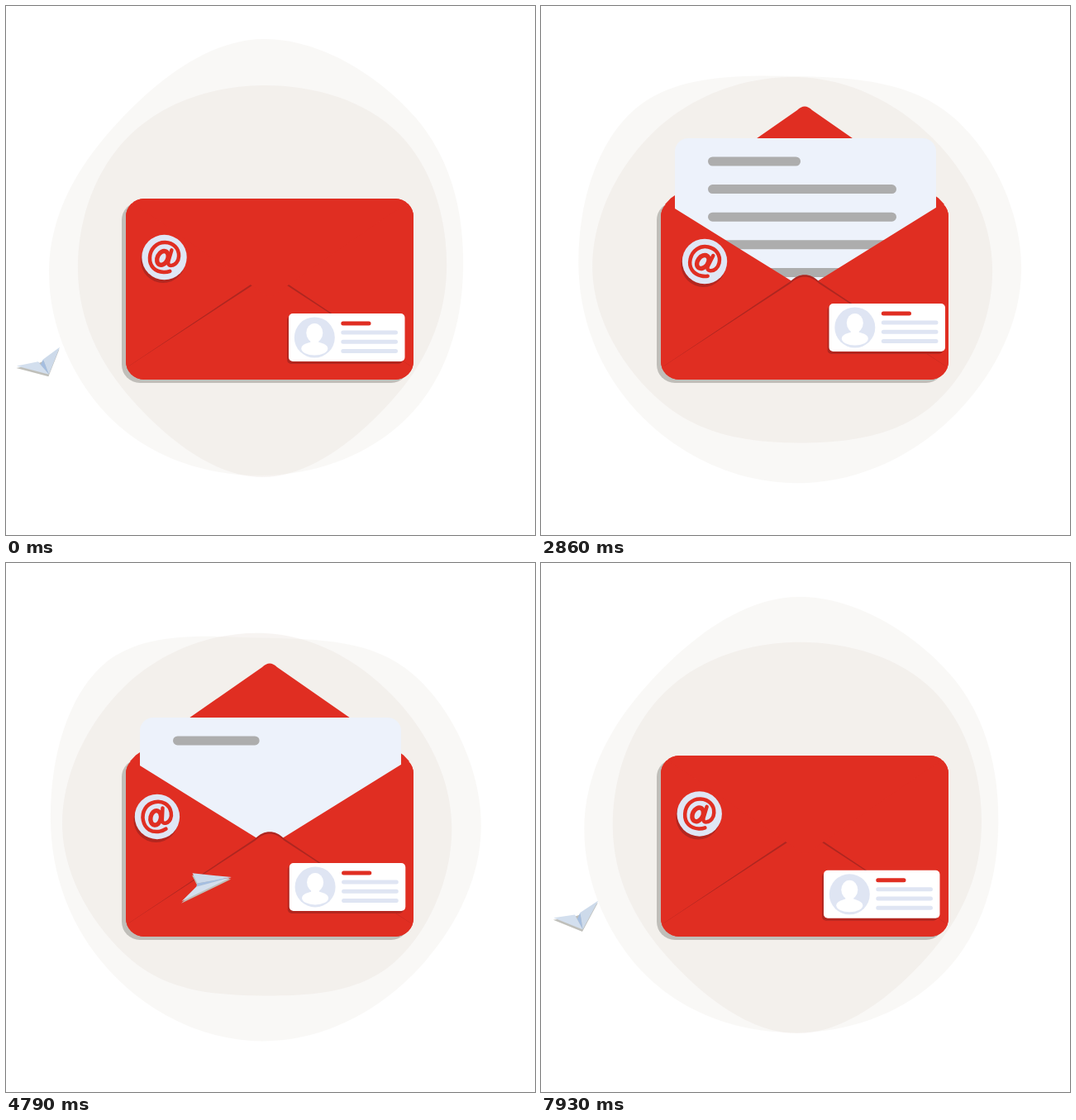
These frames come from a looping animation (640x640 px, 8000 ms). An HTML page:

```html
<!DOCTYPE html>
<html lang="en">
<head>
<meta charset="utf-8">
<title>Mail</title>
<style>
html, body { margin: 0; width: 100%; height: 100%; overflow: hidden; background: #fff; }
svg { display: block; width: 100vw; height: 100vh; }
</style>
</head>
<body>
<svg viewBox="0 0 640 640">
  <defs>
    <clipPath id="bodyClip"><rect x="145" y="233" width="348" height="219" rx="22"/></clipPath>
    <path id="flap" d="M150 0 L157 -7.5 L310 -114 Q319 -123 328 -114 L481 -7.5 L488 0 Z" fill="#e02e22"/>
  </defs>

  <path id="outer" fill="#e7e2da" fill-opacity=".25"/>
  <path id="inner" fill="#e7ded6" fill-opacity=".33"/>

  <g id="behind"></g>

  <rect x="140" y="237" width="348" height="219" rx="22" fill="#c0beb9"/>
  <use id="flapBack" href="#flap"/>
  <rect x="145" y="233" width="348" height="219" rx="22" fill="#e02e22"/>

  <g id="paper">
    <rect x="162" y="160" width="316" height="185" rx="16" fill="#edf2fb"/>
    <path id="lines" fill="none" stroke="#adadad" stroke-width="11" stroke-linecap="round"/>
  </g>

  <g clip-path="url(#bodyClip)">
    <path d="M145 234.5 L319 342.5 L493 234.5 V452 H145 Z" fill="#e02e22"/>
    <path d="M148 436 L302 333 C312 322.5 326 322.5 336 333 L490 436 Z" fill="#ae2620"/>
    <path d="M148 436 L302 335.5 C312 325 326 325 336 335.5 L490 436 Z" fill="#e02e22"/>
    <use id="flapFront" href="#flap"/>
  </g>

  <g id="badge">
    <circle cx="-1.5" cy="4" r="27" fill="#b3261f"/>
    <circle r="27.2" fill="#dfe6f5"/>
    <g id="at" fill="none" stroke="#e02e22" stroke-linecap="round">
      <ellipse cx="-2" cy="1" rx="6.2" ry="8.8" transform="rotate(24 -2 1)" stroke-width="5.4"/>
      <path stroke-width="4.5" d="M8.5 -9 L5 5 Q4.5 10 9 9.5 C14 9 17.5 4 17.5 -2
        C17.5 -12 10 -18 .5 -18 C-10 -18 -17.5 -9.5 -17.5 1 C-17.5 12 -10 18 0 18 Q4 18 7.5 16.5"/>
    </g>
  </g>

  <g id="card">
    <rect x="-2" y="3" width="140" height="58" rx="5" fill="#b3261f"/>
    <rect width="140.5" height="58" rx="5" fill="#fff"/>
    <circle cx="31.3" cy="29" r="24.5" fill="#dfe5f3"/>
    <g fill="#fff">
      <ellipse cx="31.3" cy="23.5" rx="10" ry="11.5"/>
      <rect x="26.3" y="30" width="10" height="8"/>
      <ellipse cx="31.3" cy="42.5" rx="16" ry="8"/>
    </g>
    <g stroke="#dfe5f3" stroke-width="5" stroke-linecap="round">
      <path d="M65.8 12 H97" stroke="#e02e22"/>
      <path d="M65.8 23 H129.5 M65.8 34.3 H129.5 M65.8 45.5 H129.5"/>
    </g>
  </g>

  <g id="front">
    <g id="plane">
      <polygon id="planeShade" fill="#bfbfba" transform="translate(-.5 2.5)"/>
      <polygon id="wingB" fill="#cddaea"/>
      <polygon id="keel" fill="#a5bee0"/>
      <polygon id="wingA" fill="#d3dfee"/>
    </g>
  </g>
</svg>
<script>
const LOOP = 8000, CYCLE = 4000, TURN = 2 * Math.PI;
const { sin, cos, abs, floor, min, max } = Math;
const el = id => document.getElementById(id);
const set = (id, name, value) => el(id).setAttribute(name, value);

// Each blob swings between two outlines, given as radii every 45 degrees.
const BLOBS = {
  outer: [[243, 250, 248, 256, 258, 250, 280, 262], [275, 258, 261, 255, 260, 284, 217, 262]],
  inner: [[223, 222, 250, 222, 223, 229, 224, 234], [235, 232, 192, 228, 251, 243, 238, 224]]
};
// Drift stops: time, x, y
const BADGE = [[0, 191.5, 304], [930, 202, 308], [2860, 198, 309], [4000, 191.5, 306],
  [5210, 180, 307], [5570, 187.5, 303], [6860, 204, 293]];
const CARD = [[0, 342, 372], [930, 342, 366], [2860, 348.5, 360],
  [4000, 338, 363], [5570, 348, 362.5], [6860, 341.5, 362.5]];

const progress = (t, from, to) => min(1, max(0, (t - from) / (to - from)));
const ease = p => (1 - cos(Math.PI * p)) / 2;
const mix = (a, b, p) => a + (b - a) * p;

// Smooth closed drift through the stops.
function drift(stops, t) {
  const n = stops.length;
  const stop = i => {
    const [time, x, y] = stops[(i + n) % n];
    return [time + floor(i / n) * LOOP, x, y];
  };
  const i = stops.filter(s => s[0] <= t).length - 1;
  const [a, b, c, d] = [-1, 0, 1, 2].map(k => stop(i + k));
  const span = c[0] - b[0], u = (t - b[0]) / span, u2 = u * u, u3 = u2 * u;
  return [1, 2].map(k => {
    const v0 = (c[k] - a[k]) / (c[0] - a[0]) * span, v1 = (d[k] - b[k]) / (d[0] - b[0]) * span;
    return mix(b[k], c[k], 3 * u2 - 2 * u3) + (u3 - 2 * u2 + u) * v0 + (u3 - u2) * v1;
  });
}

function drawBlob(id, t) {
  const [from, to] = BLOBS[id], n = from.length;
  const swing = 1 - abs(t / CYCLE - 1), stretch = 1 + .025 * sin(TURN * t / LOOP);
  const pts = from.map((r, i) => {
    const a = i * TURN / n, radius = mix(r, to[i], swing);
    return [310 + radius * stretch * cos(a), 320 + radius * sin(a)];
  });
  const at = i => pts[(i + n) % n];
  const handle = (i, dir) => at(i).map((v, k) => v + dir * (at(i + 1)[k] - at(i - 1)[k]) * .185);
  const curves = pts.map((_, i) => "C" + [handle(i, 1), handle(i + 1, -1), at(i + 1)].join(" "));
  set(id, "d", "M" + pts[0] + curves.join("") + "Z");
}

// The plane circles the envelope on a tilted orbit, turning with its heading.
function drawPlane(t) {
  const o = TURN * t / CYCLE;
  const heading = o + .07 + .21 * sin(2 * o - 3.91);
  const mid = [312 - 273 * cos(o) - 8 * sin(2 * o), 320 + 104 * cos(o) + 41 * sin(o)];
  const ahead = [60 * sin(heading), 23 * cos(heading) - 32 * sin(heading) + 6];
  const side = [29 * cos(heading + .24), -17 * sin(heading + .52)];
  const point = (f, s, drop = 0) => [0, 1].map(k => mid[k] + f * ahead[k] + s * side[k] + k * drop);
  const nose = point(1, 0), keel = point(.15, 0, 9);
  const a = point(0, -1), b = point(0, 1), notchA = point(.22, -.12), notchB = point(.22, .12);
  const poly = (id, ...pts) => set(id, "points", pts.join(" "));
  poly("planeShade", nose, a, notchA, notchB, b);
  poly("wingA", nose, a, notchA);
  poly("wingB", nose, b, notchB);
  poly("keel", nose, notchA, keel, notchB);
  el(sin(o) < 0 ? "behind" : "front").appendChild(el("plane"));
}

function drawEnvelope(t) {
  const open = ease(progress(t, 70, 500)) - ease(progress(t, 3330, 3820));
  const s = 2 * open - 1;
  for (const [id, shown] of [["flapBack", s > 0], ["flapFront", s <= 0]]) {
    set(id, "transform", `translate(0 ${236.5 + 3.5 * s}) scale(1 ${s})`);
    set(id, "display", shown ? "inline" : "none");
  }
  const up = ease(progress(t, 380, 1010)) - ease(progress(t, 2920, 3450));
  set("paper", "transform", `translate(0 ${100 * (1 - up)})`);
  let d = "";
  for (let i = 0; i < 5; i++) {
    const start = 587 + 210 * i, p = progress(t, start, start + 220);
    if (p) d += `M207.5 ${188 + 33.6 * i}h${(i ? 217 : 101) * p}`;
  }
  set("lines", "d", d);
}

function draw(now) {
  const t = now % LOOP;
  drawBlob("outer", t);
  drawBlob("inner", t);
  const [x, y] = drift(BADGE, t);
  set("badge", "transform", `translate(${x} ${y})`);
  set("at", "transform", `rotate(${(x - 190) * 1.6})`);
  set("card", "transform", `translate(${drift(CARD, t)})`);
  drawEnvelope(t % CYCLE);
  drawPlane(t % CYCLE);
}

const begin = performance.now();
function tick() {
  draw(performance.now() - begin);
  requestAnimationFrame(tick);
}
tick();
</script>
</body>
</html>
```
